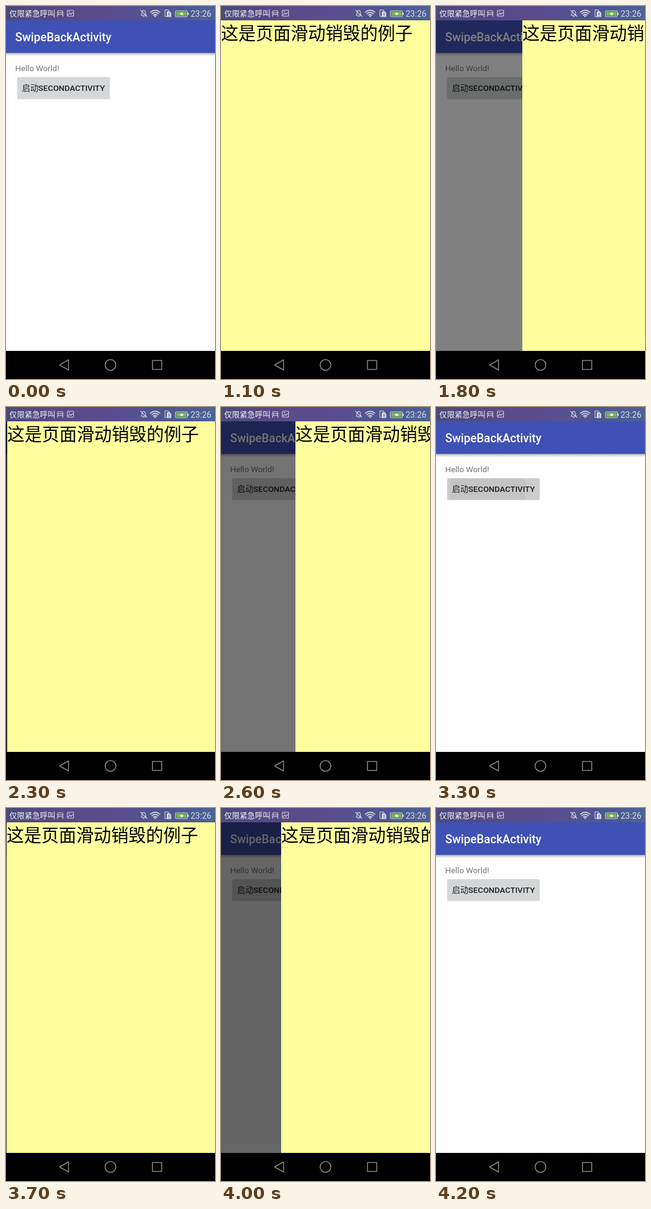
An HTML page that plays this animation: 351x624 px, repeating every 5 s.

```html
<!DOCTYPE html>
<html lang="zh-CN">
<head>
<meta charset="utf-8">
<style>
  html, body { margin: 0; width: 100%; height: 100%; overflow: hidden; background: #000; }
  svg { display: block; width: 351px; height: 624px; font-family: Roboto, "Noto Sans CJK SC", "Noto Sans CJK", sans-serif; }
  .line { fill: none; stroke: #d3d3e2; stroke-width: 1.1; stroke-linejoin: round; stroke-linecap: round; }
  .nav { fill: none; stroke: #858585; stroke-width: 1.6; stroke-linejoin: round; }
  .medium { font-weight: 500; }
</style>
</head>
<body>
<svg viewBox="0 0 351 624">
  <defs>
    <linearGradient id="statusFill">
      <stop offset="0" stop-color="#4b4a7b"/>
      <stop offset=".25" stop-color="#584985"/>
      <stop offset=".55" stop-color="#5b4e90"/>
      <stop offset=".8" stop-color="#4c5790"/>
      <stop offset="1" stop-color="#4d6297"/>
    </linearGradient>
    <linearGradient id="shadow" x2="0" y2="1">
      <stop offset="0" stop-opacity=".3"/>
      <stop offset="1" stop-opacity="0"/>
    </linearGradient>
  </defs>

  <g id="home">
    <rect y="24" width="351" height="553" fill="#fff"/>
    <rect y="78" width="351" height="6" fill="url(#shadow)"/>
    <rect y="24" width="351" height="54.5" fill="#3f51b5"/>
    <text class="medium" x="15.6" y="59" font-size="19.5" fill="#fff">SwipeBackActivity</text>
    <text x="15.6" y="109" font-size="13.65" fill="#757575">Hello World!</text>
    <rect x="18.5" y="119.5" width="156" height="36.5" rx="2.5" opacity=".13"/>
    <rect id="button" x="19" y="119" width="155" height="36" rx="2" fill="#d5d6d7"/>
    <rect id="ripple" x="24" y="120" width="126" height="35" rx="5" fill="#c4c4c4"/>
    <text class="medium" x="27" y="142" font-size="13.65" fill="#202020">启动SECONDACTIVITY</text>
  </g>
  <rect id="scrim" y="24" width="351" height="553"/>

  <g id="second">
    <rect y="24" width="351" height="553" fill="#ffff9e"/>
    <text y="56" font-size="29.25" fill="#000">这是页面滑动销毁的例子</text>
  </g>

  <g id="statusBar">
    <rect width="351" height="24" fill="url(#statusFill)"/>
    <text x="5.5" y="17.3" font-size="12.9" fill="#f4f4fa">仅限紧急呼叫</text>
    <g class="line">
      <path d="M87 11V8h8v3M85.500 11.500h11M86 14.500h10M87.500 11.500v3M94.500 11.500v3M86.500 15v2.500M95.500 15v2.500"/>
      <rect x="103" y="7" width="10.500" height="10" rx="1"/>
      <path d="M104 15l3-3 2 2 3-3M105.500 9.500h2"/>
      <path d="M227 15.500c1.500-1.500 1-3.500 1.500-5.500c1-3.500 4.500-3.500 5.500 0c.5 2 0 4 1.500 5.500zM230 17.500h2.500M226 7l10.500 10.500"/>
      <path stroke-width="1.7" d="M242.500 10.300q8-6.500 16 0M245 12.800q5.500-4.400 11 0M247.500 15.300q3-2.400 6 0"/>
      <path d="M270 17.500h-3v-11h5l2 2"/>
    </g>
    <circle cx="250.500" cy="17" r="1.4" fill="#d3d3e2"/>
    <path d="M270 9h5l2.500 2.500v7h-7.500z" fill="#d3d3e2"/>
    <path d="M273.800 11.500v3.500M273.800 16.200v1" stroke="#555686" stroke-width="1.2"/>
    <rect class="line" x="284.500" y="8" width="20" height="10" rx="1.5"/>
    <rect x="286" y="9.500" width="17" height="7" fill="#79b84b"/>
    <path d="M305 11h1.800v4H305z" fill="#d3d3e2"/>
    <path d="M291 13.600l4.500-3.300v2l3.500.1-4.500 3.500v-2z" fill="#fff"/>
    <text x="310" y="17.600" font-size="14" fill="#dadae6">23:26</text>
  </g>

  <rect y="577" width="351" height="47"/>
  <g class="nav">
    <path d="M90 600.500L105 592v17z"/>
    <circle cx="175.500" cy="600.500" r="9"/>
    <rect x="246" y="593" width="15.500" height="15"/>
  </g>
</svg>
<script>
  const WIDTH = 351, LOOP = 5000, STEP = 100;
  const [button, ripple, scrim, second] =
    ['button', 'ripple', 'scrim', 'second'].map(id => document.getElementById(id));

  const within = (t, from, to) => t >= from && t < to;
  const smooth = (t, from, to) => {
    const u = Math.min(1, Math.max(0, (t - from) / (to - from)));
    return u * u * (3 - 2 * u);
  };

  // Half swipe that springs back, full swipe, then an accelerating swipe.
  function pageOffset(t) {
    if (t >= 3400) return WIDTH * Math.max(0, (t - 3600) / 600) ** 3.07;
    const halfSwipe = 150 * (smooth(t, 1400, 1850) - smooth(t, 1800, 2340));
    return halfSwipe + WIDTH * smooth(t, 2300, 3045);
  }

  function render(t) {
    const open = within(t, 1000, 3100) || within(t, 3400, 4200);
    const pressed = within(t, 800, 1000) || within(t, 3300, 3400);
    const x = Math.round(pageOffset(t));
    second.style.display = scrim.style.display = open ? '' : 'none';
    second.setAttribute('transform', `translate(${x} 0)`);
    scrim.setAttribute('opacity', 0.85 * Math.max(0, 1 - x / WIDTH));
    button.setAttribute('fill', pressed ? '#cccccc' : '#d5d6d7');
    ripple.style.display = pressed ? '' : 'none';
  }

  const start = performance.now();
  function tick() {
    const t = (performance.now() - start) % LOOP;
    render(Math.floor(t / STEP) * STEP);
    requestAnimationFrame(tick);
  }
  tick();
</script>
</body>
</html>
```
